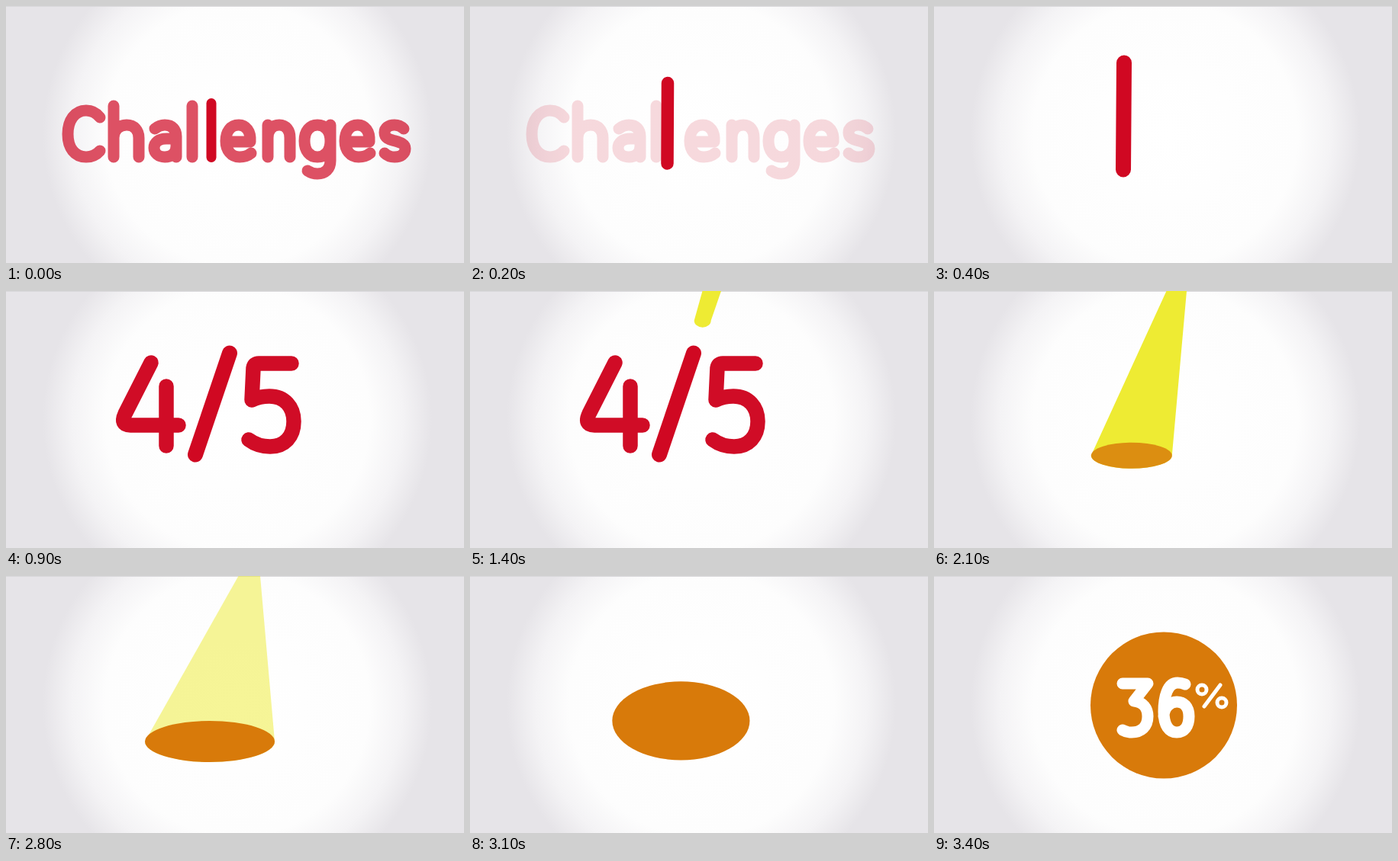
Recreate the animation shown at these times as an HTML page. Size 600 by 337 pixels, loop 3.5 s.

```html
<!DOCTYPE html>
<html lang="en">
<head>
<meta charset="utf-8">
<title>Challenges</title>
<style>
  html, body { margin: 0; width: 100%; height: 100%; overflow: hidden; }
  svg { display: block; width: 100vw; height: 100vh; }
  .pen { fill: none; stroke-linecap: round; stroke-linejoin: round; }
</style>
</head>
<body>
<svg viewBox="0 0 600 337" role="img" aria-label="Challenges, 4/5, 36%">
  <defs>
    <radialGradient id="glow" gradientUnits="userSpaceOnUse" cx="303" cy="168" r="255">
      <stop offset="0" stop-color="#fff"/>
      <stop offset=".68" stop-color="#fdfdfd"/>
      <stop offset=".85" stop-color="#f4f3f5"/>
      <stop offset="1" stop-color="#e6e4e8"/>
    </radialGradient>
    <path id="e" d="M289 178H320C321 164 314 156 305 156C294 156 288 165 288 177S295 198 306 198Q315 198 321 193"/>
  </defs>
  <rect width="600" height="337" fill="url(#glow)"/>
  <path d="M0 .5H600" stroke="#d8d7da"/>

  <g id="word" class="pen" stroke="#d00c26" stroke-width="15">
    <path d="M123 146Q116 137 105 137C90 137 81 150 81 168S90 198 105 198Q116 198 123 190"/>
    <path d="M141 131V198M141 173C141 163 148 156 158 156S174 163 174 173V198"/>
    <path d="M195 161Q201 156 208 156C218 156 223 162 223 171V198M223 174H210C200 174 194 179 194 186S200 198 208 198S223 194 223 184"/>
    <path d="M244 131V198"/>
    <use href="#e"/>
    <path d="M343 156V198M343 173C343 163 349 156 358 156S372 163 372 173V198"/>
    <path d="M425 177C425 164 418 156 408 156S391 164 391 177S398 198 408 198S425 190 425 177M425 156V203C425 214 418 220 408 220Q401 220 395 216"/>
    <use href="#e" x="156"/>
    <path d="M521 161Q516 156 509 156C501 156 496 160 496 166C496 174 503 175 510 177S523 181 523 187C523 194 517 198 509 198Q501 198 496 193"/>
  </g>

  <g id="digits" class="pen" stroke="#d00c26" stroke-width="19.5">
    <path pathLength="1" d="M190 94L156 161Q149 176 163 176H226M210 125V203"/>
    <path pathLength="1" d="M374 95H331Q325 95 324 101L322 143Q332 138 345 138C365 138 377 152 377 171C377 191 365 204 346 204Q330 204 318 195"/>
  </g>
  <line id="bar" class="pen" stroke="#d00822"/>

  <path id="beam" fill="#eeeb33"/>
  <ellipse id="disc" fill="#d87a0a"/>

  <g id="percent" class="pen" stroke="#fff" stroke-width="15">
    <path d="M247 141H280L262 164C274 165 280 174 280 184C280 198 271 205 259 205Q252 205 247 202"/>
    <path d="M329 142Q324 140 319 140C306 140 301 158 301 178C301 196 308 205 318 205S334 197 334 184S327 165 318 165S301 173 301 184"/>
    <path stroke-width="5" d="M375 143L354 171M345 149a6 6 0 1 0 12 0a6 6 0 1 0 -12 0M371 166a6 6 0 1 0 12 0a6 6 0 1 0 -12 0"/>
  </g>
</svg>
<script>
const LOOP = 3500, STEP = 100;
const $ = id => document.getElementById(id);
const set = (el, attrs) => {
  for (const name in attrs) el.setAttribute(name, attrs[name]);
};
const mix = (a, b, p) => a + (b - a) * p;

// Progress from 0 to 1 between two times
const ramp = (t, from, to) => Math.min(1, Math.max(0, (t - from) / (to - from)));
const ease = (t, from, to) => {
  const p = ramp(t, from, to);
  return p * p * (3 - 2 * p);
};

// Linear track through [time, value] points
function track(t, points) {
  let value = points[0][1];
  for (let i = 1; i < points.length; i++) {
    const [t0, v0] = points[i - 1], [t1, v1] = points[i];
    if (t >= t0) value = mix(v0, v1, ramp(t, t0, t1));
  }
  return value;
}

function drawBar(t) {
  const grow = ease(t, 0, 400), tilt = ease(t, 400, 700);
  set($("bar"), {
    x1: mix(mix(269, 249, grow), 293, tilt),
    y1: mix(mix(127.5, 74.5, grow), 81.5, tilt),
    x2: mix(269, 248, grow),
    y2: mix(198.5, 214.5, grow),
    "stroke-width": mix(13, 20, grow),
    opacity: t < 1700 ? 1 : 0
  });
}

function drawDigits(t) {
  const p = ease(t, 500, 800);
  set($("digits"), {
    "stroke-dasharray": `${p} 2`,
    opacity: p > 0 ? track(t, [[1600, 1], [1700, .94], [2000, 0]]) : 0
  });
}

function drawLight(t) {
  const fall = ramp(t, 1300, 1700), morph = ease(t, 3000, 3300);
  const spread = track(t, [[1700, 11], [2100, 53], [2400, 76], [2800, 85], [3000, 88]]);
  const cx = 248 + (spread - 11) * .257;
  const cy = mix(-20, 215, fall) + 2 * ramp(t, 1700, 2800);
  const ry = track(t, [[1700, 9], [2100, 17], [2400, 24], [2800, 27], [3000, 36]]);
  const top = track(t, [[1700, 329], [2100, 331], [2800, 333]]);

  // While falling, the tip slides along the slanted line
  const x = mix(317, cx, Math.max(0, cy) / 217);
  const tip = fall < 1 ? x : cx;
  set($("beam"), {
    d: `M304.5 0H${top}L${tip + spread} ${cy}A${spread} ${ry} 0 0 1 ${tip - spread} ${cy}Z`,
    opacity: t > 1300 ? track(t, [[2500, 1], [2800, .51], [3000, 0]]) : 0
  });
  set($("disc"), {
    cx: mix(cx, 301, morph),
    cy: mix(cy - 20 * ramp(t, 2800, 3000), 169.5, morph),
    rx: mix(spread, 96, morph),
    ry: mix(ry, 96, morph),
    opacity: track(t, [[1700, 0], [2100, .82], [2500, 1]])
  });
}

function draw(now) {
  const t = Math.floor(now % LOOP / STEP) * STEP;
  set($("word"), { opacity: track(t, [[0, .71], [100, .42], [200, .15], [300, 0]]) });
  drawBar(t);
  drawDigits(t);
  drawLight(t);
  set($("percent"), { opacity: ramp(t, 3100, 3400) });
  requestAnimationFrame(draw);
}
draw(0);
</script>
</body>
</html>
```
